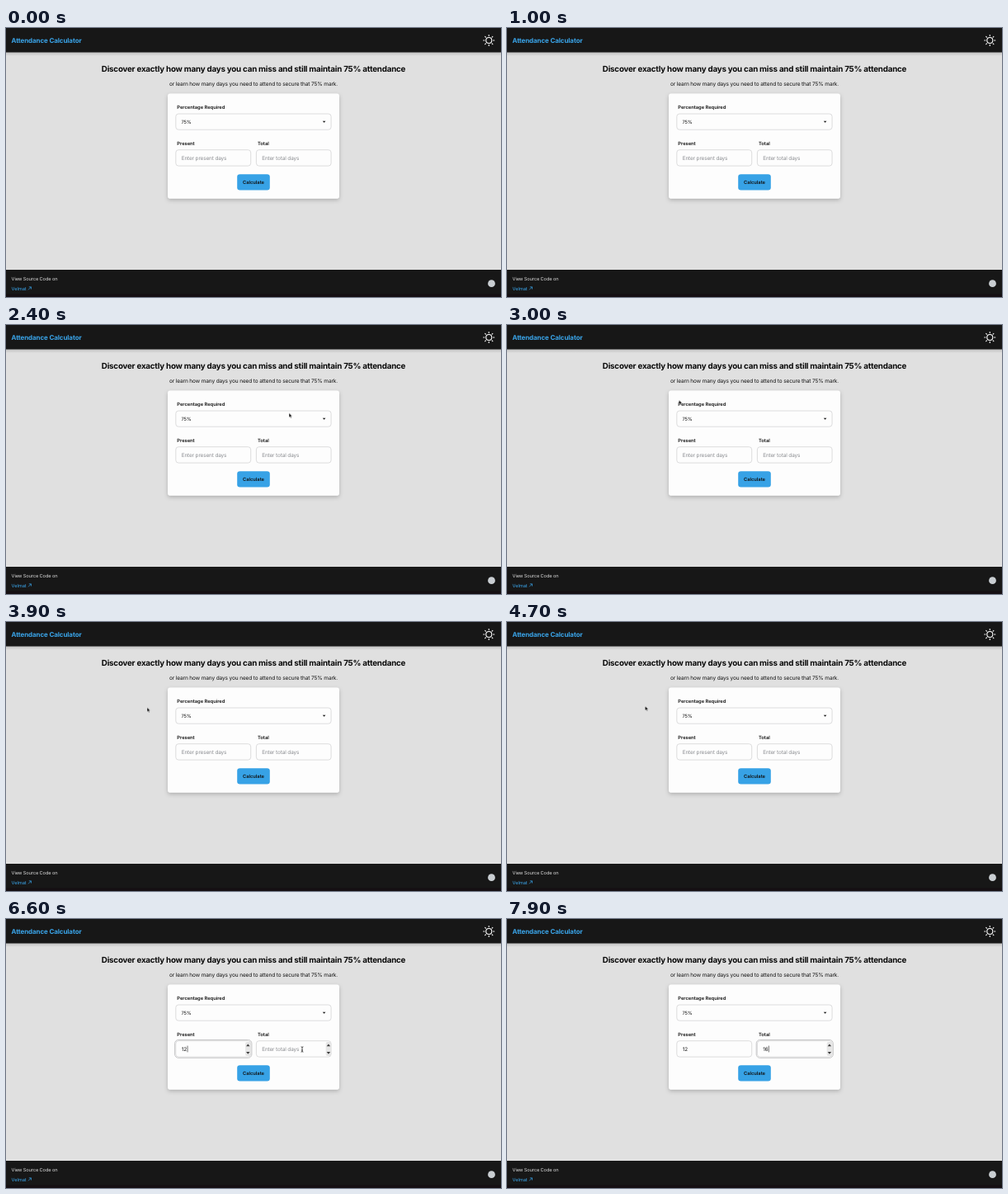
These frames come from a looping animation (600 px wide and 326 px high, 8 s). An HTML page:

```html
<!DOCTYPE html>
<html lang="en">
<head>
<meta charset="utf-8">
<title>Attendance Calculator</title>
<style>
  html, body { margin: 0; width: 100%; height: 100%; overflow: hidden; background: #e0e0e0; }
  svg { display: block; width: 100%; height: 100%; }
  text { font-family: Inter, Roboto, sans-serif; font-size: 5.8px; fill: #111; text-rendering: geometricPrecision; white-space: pre; }
  .brand { font-size: 8px; font-weight: 700; letter-spacing: -.115px; fill: #3aa5ea; }
  .title { font-size: 9.8px; font-weight: 700; letter-spacing: -.22px; text-anchor: middle; fill: #0a0a0a; }
  .sub { font-size: 6.5px; letter-spacing: -.115px; text-anchor: middle; }
  .label { font-weight: 600; letter-spacing: -.03px; }
  .mid { text-anchor: middle; }
  .hint { font-size: 6.4px; letter-spacing: -.11px; fill: #8b8d91; }
  .value { font-size: 6.3px; }
  .foot { font-size: 5.7px; letter-spacing: -.12px; fill: #dcdcdc; }
  .link { fill: #3aa5ea; letter-spacing: -.05px; }
  .field { fill: #fdfdfd; stroke: #cfcfd0; stroke-width: .7; }
  .ring { fill: none; stroke: #c6c6c7; stroke-width: 1; }
  .caret { fill: #111; }

  /* Discrete states, held until the next key */
  .state { animation: 8s step-end infinite; }
  #ring1 { animation-name: ring1; }
  #ring2 { animation-name: ring2; }
  #spin1 { animation-name: spin1; }
  #spin2 { animation-name: spin2; }
  #hint1 { animation-name: hint1; }
  #hint2 { animation-name: hint2; }
  #p1 { animation-name: p1; }
  #p12 { animation-name: p12; }
  #t1 { animation-name: t1; }
  #t16 { animation-name: t16; }
  #caret1 { animation-name: caret1; }
  #caret2 { animation-name: caret2; }
  @keyframes ring1 { 0%, 86.25%, 100% { opacity: 0 } 66.25% { opacity: 1 } }
  @keyframes ring2 { 0% { opacity: 0 } 86.25%, 100% { opacity: 1 } }
  @keyframes spin1 { 0%, 86.25%, 100% { opacity: 0 } 65% { opacity: 1 } }
  @keyframes spin2 { 0% { opacity: 0 } 81.25%, 100% { opacity: 1 } }
  @keyframes hint1 { 0% { opacity: 1 } 75%, 100% { opacity: 0 } }
  @keyframes hint2 { 0% { opacity: 1 } 87.5%, 100% { opacity: 0 } }
  @keyframes p1 { 0%, 77.5%, 100% { opacity: 0 } 75% { opacity: 1 } }
  @keyframes p12 { 0% { opacity: 0 } 77.5%, 100% { opacity: 1 } }
  @keyframes t1 { 0%, 88.75%, 100% { opacity: 0 } 87.5% { opacity: 1 } }
  @keyframes t16 { 0% { opacity: 0 } 88.75%, 100% { opacity: 1 } }
  @keyframes caret1 {
    0%, 72.5%, 83.75%, 100% { opacity: 0; transform: none }
    66.25% { opacity: 1; transform: none }
    75% { opacity: 1; transform: translateX(3px) }
    77.5% { opacity: 1; transform: translateX(6.8px) }
  }
  @keyframes caret2 {
    0% { opacity: 0; transform: none }
    86.25% { opacity: 1; transform: none }
    87.5% { opacity: 1; transform: translateX(3px) }
    88.75% { opacity: 1; transform: translateX(6.8px) }
    93.75% { opacity: 0; transform: translateX(6.8px) }
    98.75%, 100% { opacity: 1; transform: translateX(6.8px) }
  }

  /* Pointer: moves in 100 ms steps */
  #arrow { animation: arrow-path 8s infinite, arrow-show 8s step-end infinite; }
  #beam { animation: beam-path 8s infinite, beam-show 8s step-end infinite; }
  @keyframes arrow-show { 0%, 65%, 100% { opacity: 0 } 22.5% { opacity: 1 } }
  @keyframes arrow-path {
    0% { transform: translate(548px, 129.5px) }
    23.75% { transform: translate(548px, 129.5px); animation-timing-function: steps(3) }
    27.5% { transform: translate(388px, 112px); animation-timing-function: steps(8) }
    37.5% { transform: translate(208.5px, 91px); animation-timing-function: steps(7) }
    46.25% { transform: translate(172px, 104px); animation-timing-function: steps(10) }
    58.75% { transform: translate(167.5px, 102px); animation-timing-function: steps(5) }
    65%, 100% { transform: translate(240px, 158px) }
  }
  @keyframes beam-show { 0%, 75%, 87.5%, 100% { opacity: 0 } 65%, 78.75% { opacity: 1 } }
  @keyframes beam-path {
    0% { transform: translate(240px, 158px) }
    65% { transform: translate(240px, 158px); animation-timing-function: steps(1) }
    66.25% { transform: translate(247px, 162px) }
    78.75% { transform: translate(247px, 162px); animation-timing-function: steps(3) }
    82.5%, 100% { transform: translate(359px, 158px) }
  }
</style>
</head>
<body>
<svg viewBox="0 0 600 326" preserveAspectRatio="none">
  <defs>
    <linearGradient id="fade" x2="0" y2="1">
      <stop stop-color="#000" stop-opacity=".16"/>
      <stop offset="1" stop-color="#000" stop-opacity="0"/>
    </linearGradient>
    <filter id="shadow" x="-10%" y="-10%" width="120%" height="125%">
      <feDropShadow dx="0" dy="2" stdDeviation="2.6" flood-color="#000" flood-opacity=".22"/>
    </filter>
    <g id="spinner">
      <rect x="-3.2" y="149" width="6.4" height="17" rx="2" fill="#e6e6e6"/>
      <path d="M-2.2 154.2L0 151.4L2.2 154.2ZM-2.2 161L0 163.8L2.2 161Z" fill="#3c3c3c"/>
    </g>
    <path id="ray" d="M0 -5.4V-6.5"/>
  </defs>

  <rect width="600" height="326" fill="#e0e0e0"/>
  <rect y="29" width="600" height="5" fill="url(#fade)"/>
  <rect width="600" height="29.5" fill="#171717"/>
  <rect y="293" width="600" height="33" fill="#171717"/>
  <rect y="322.5" width="600" height="3.5" fill="#150f13"/>

  <text class="brand" x="6.5" y="18">Attendance Calculator</text>
  <g transform="translate(585.3 15)" fill="none" stroke="#fff" stroke-width="1.1" stroke-linecap="round">
    <circle r="3.5"/>
    <use href="#ray"/>
    <use href="#ray" transform="rotate(45)"/>
    <use href="#ray" transform="rotate(90)"/>
    <use href="#ray" transform="rotate(135)"/>
    <use href="#ray" transform="rotate(180)"/>
    <use href="#ray" transform="rotate(225)"/>
    <use href="#ray" transform="rotate(270)"/>
    <use href="#ray" transform="rotate(315)"/>
  </g>

  <text class="title" x="300" y="53">Discover exactly how many days you can miss and still maintain 75% attendance</text>
  <text class="sub" x="300" y="70">or learn how many days you need to attend to secure that 75% mark.</text>

  <rect x="196" y="79.5" width="208" height="127.3" rx="3" fill="#fdfdfd" filter="url(#shadow)"/>
  <text class="label" x="207.3" y="98.4">Percentage Required</text>
  <rect class="field" x="205.8" y="104" width="188.3" height="19.2" rx="3.3"/>
  <text x="212.4" y="115.6">75%</text>
  <path d="M383.8 112.7H387.4L385.6 114.7Z" fill="#111"/>

  <text class="label" x="207.3" y="142.4">Present</text>
  <text class="label" x="305" y="142.4">Total</text>
  <rect class="field" x="205.8" y="147.7" width="90.9" height="19.4" rx="3.3"/>
  <rect class="field" x="303.4" y="147.7" width="90.7" height="19.4" rx="3.3"/>
  <rect id="ring1" class="ring state" x="204.6" y="146.5" width="93.3" height="21.8" rx="4.3"/>
  <rect id="ring2" class="ring state" x="302.2" y="146.5" width="93.1" height="21.8" rx="4.3"/>
  <g id="spin1" class="state"><use href="#spinner" x="293.3"/></g>
  <g id="spin2" class="state"><use href="#spinner" x="390.9"/></g>

  <text id="hint1" class="hint state" x="212.7" y="160">Enter present days</text>
  <text id="p1" class="value state" x="212.7" y="160">1</text>
  <text id="p12" class="value state" x="212.7" y="160">12</text>
  <text id="hint2" class="hint state" x="310.2" y="160">Enter total days</text>
  <text id="t1" class="value state" x="310.2" y="160">1</text>
  <text id="t16" class="value state" x="310.2" y="160">16</text>
  <rect id="caret1" class="caret state" x="212.8" y="153.6" width=".6" height="7.8"/>
  <rect id="caret2" class="caret state" x="310.4" y="153.6" width=".6" height="7.8"/>

  <rect x="280.2" y="177.2" width="39.6" height="19.4" rx="3.3" fill="#37a2e6"/>
  <text class="label mid" x="300" y="189.1">Calculate</text>

  <text class="foot" x="6.6" y="306.2">View Source Code on</text>
  <text class="foot link" x="6.6" y="317.6">Velmat</text>
  <path d="M27 317.3L30.4 313.9M27.8 313.8H30.5V316.5" fill="none" stroke="#3aa5ea" stroke-width=".7"/>
  <circle cx="588.5" cy="309.7" r="4.4" fill="#c9ced2"/>

  <path id="arrow" d="M0 0V5.2L1.2 4.1L2.1 6.1L3 5.7L2.1 3.8H3.7Z" fill="#000" stroke="#fff" stroke-width=".35"/>
  <path id="beam" d="M-1.4 -3.2Q0 -3.2 0 -2.4Q0 -3.2 1.4 -3.2M0 -2.6V2.6M-1.4 3.2Q0 3.2 0 2.4Q0 3.2 1.4 3.2M-.8 1H.8" fill="none" stroke="#111" stroke-width=".7"/>
</svg>
</body>
</html>
```
